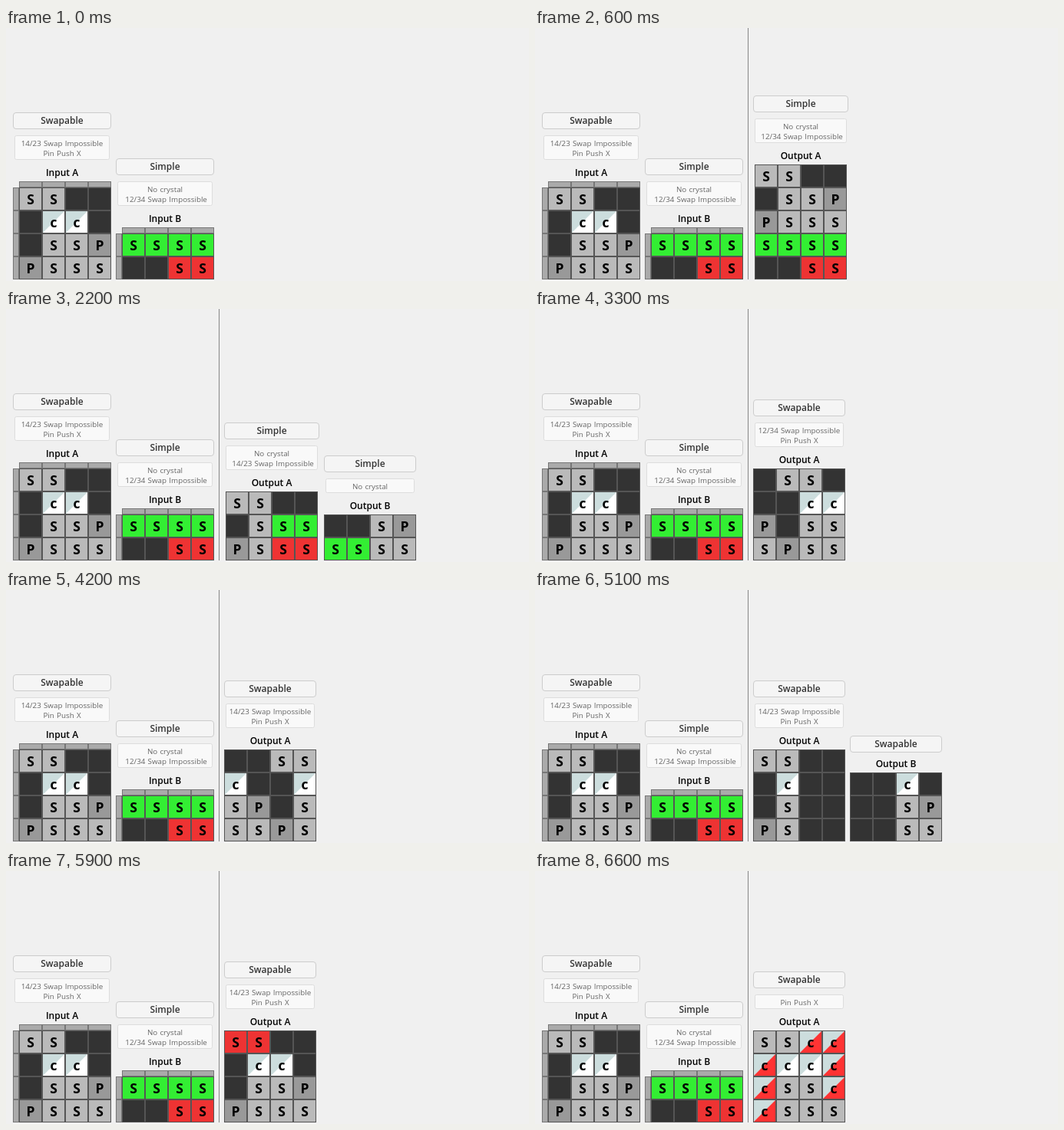
Recreate the animation shown at these times as an HTML page. Size 681 by 330 pixels, loop 7.4 s.

```html
<!DOCTYPE html>
<html>
<head>
<meta charset="utf-8">
<style>
html, body { margin: 0; width: 100%; height: 100%; overflow: hidden; background: #f0f0f0; }
svg { display: block; font-family: "Open Sans", "Noto Sans", sans-serif; text-anchor: middle; }
.name { font-size: 12px; font-weight: 600; fill: #333; }
.title { font-size: 12px; font-weight: 600; fill: #000; }
.note { font-size: 9.8px; word-spacing: .7px; fill: #666; white-space: pre; }
.cell { font-size: 17.5px; font-weight: 700; fill: #000; }
</style>
</head>
<body>
<svg id="stage" width="681" height="330"></svg>
<script>
const W = 681, CELL = 30, FLOOR = 328, LOOP = 7400;
const FILL = { S: '#bababa', P: '#999', g: '#3e3', r: '#e33', '-': '#333', c: '#fff', x: '#f33' };
const LETTER = { S: 'S', g: 'S', r: 'S', P: 'P', c: 'c', x: 'c' };

const rect = (x, y, w, h, fill, stroke, r = 0) =>
  `<rect x="${x + .5}" y="${y + .5}" width="${w - 1}" height="${h - 1}" rx="${r}" fill="${fill}" stroke="${stroke}"/>`;
const text = (cls, x, y, s) => `<text class="${cls}" x="${x}" y="${y}">${s}</text>`;

function cell(x, y, kind) {
  let s = rect(x, y, CELL, CELL, FILL[kind], '#555');
  if ('cx'.includes(kind)) s += `<path d="M${x + 1} ${y + 1}h28l-28 28z" fill="#cdd"/>`;
  return LETTER[kind] ? s + text('cell', x + 15, y + 21.5, LETTER[kind]) : s;
}

// Draws one shape panel standing on the floor; rows run from top to bottom.
function panel(x, w, title, [name, notes, shape], framed) {
  const rows = shape.split('/'), mid = x + w / 2;
  const top = FLOOR - rows.length * CELL;
  const left = framed ? x + 8 : mid - 60;
  const head = framed ? top - 8 : top;
  const n = notes.length;
  const noteTop = head - 34 - n * 13;
  let s = rect(x, head - (n ? 64 + n * 13 : 48), w, 22, '#f5f5f5', '#ccc', 3.5);
  s += text('name', mid, head - (n ? 49 + n * 13 : 33), name);
  if (n) s += rect(x + 2, noteTop, w - 4, 6 + n * 13, '#f9f9f9', '#ddd', 2);
  notes.forEach((t, i) => s += text('note', mid, noteTop + 13.5 + i * 13, t));
  s += text('title', mid, head - 7, title);
  if (framed) {
    for (let i = 0; i < 4; i++) s += rect(left + i * CELL, head, CELL, 8, '#aaa', '#777');
    rows.forEach((_, i) => s += rect(x, top + i * CELL, 8, CELL, '#aaa', '#777'));
  }
  rows.forEach((row, j) => [...row].forEach((k, i) => s += cell(left + i * CELL, top + j * CELL, k)));
  return s;
}

const NO14 = '14/23 Swap Impossible', NO12 = '12/34 Swap Impossible';
const PIN = 'Pin Push X', PLAIN = 'No crystal', NB = '\u00a0';
const BASE = 'SS--/-cc-/-SSP/PSSS';
const swapable = (shape, ...notes) => ['Swapable', notes, shape];
const simple = (shape, limit) => ['Simple', limit ? [PLAIN, NB + limit] : [PLAIN], shape];
const corner = (rows, ...notes) => ['Stack Corner', notes, [...rows].map(k => k + '---').join('/')];
const turn = n => BASE.split('/').map(r => r.slice(-n) + r.slice(0, -n)).join('/');

const inputs = panel(9, 128, 'Input A', swapable(BASE, NO14, PIN), true) +
  panel(143, 128, 'Input B', simple('gggg/--rr', NO12), true);

// Start time followed by the output panels.
const steps = [
  [0],
  [600, simple('SS--/-SSP/PSSS/gggg/--rr', NO12)],
  [1000, swapable('gggg/SSrr/-cc-/-SSP/PSSS', NO14, PIN)],
  [1500, swapable(BASE + '/PPPP', NO14)],
  [1800, swapable(BASE, NO14, PIN)],
  [2200, simple('SS--/-Sgg/PSrr', NO14), simple('--SP/ggSS')],
  [2800, simple('--SP/--SS'), simple('SS--/-S--/PS--', NO14)],
  [3300, swapable(turn(1), NO12, PIN)],
  [3700, swapable(turn(3), NO12, PIN)],
  [4200, swapable(turn(2), NO14, PIN)],
  [4700],
  [5100, swapable('SS--/-c--/-S--/PS--', NO14, PIN), swapable('--c-/--SP/--SS')],
  [5400, corner('S--P', 'Virtual'), corner('ScSS'), corner('cSS'), corner('PS')],
  [5900, swapable('rr--/-cc-/-SSP/PSSS', NO14, PIN)],
  [6600, swapable(BASE.replace(/[-P]/g, 'x'), PIN)]
];

const scrollbar = `<rect y="311" width="${W}" height="19" fill="#f0f0f0"/>
  <rect x="17" y="321" width="557" height="9" fill="#cdcdcd"/>
  <path d="M10 324l-4 4 4 4M672 324l4 4-4 4" fill="none" stroke="#555" stroke-width="1.6"/>`;

function scene([, ...outputs]) {
  let s = inputs, x = 284;
  if (outputs.length) s += `<rect x="277" width="1" height="${FLOOR}" fill="#888"/>`;
  outputs.forEach((out, i) => {
    const w = out[1][0] === PLAIN && out[1].length > 1 ? 124 : 120;
    s += panel(x, w, 'Output ' + 'ABCD'[i], out);
    x += w + 6;
  });
  return x > W ? `<g transform="translate(0 -17)">${s}</g>` + scrollbar : s;
}

const stage = document.getElementById('stage');
const start = performance.now();
let shown;
function draw() {
  const t = (performance.now() - start) % LOOP;
  const step = steps.findLast(s => s[0] <= t);
  if (step !== shown) stage.innerHTML = scene(shown = step);
  requestAnimationFrame(draw);
}
draw();
</script>
</body>
</html>
```
